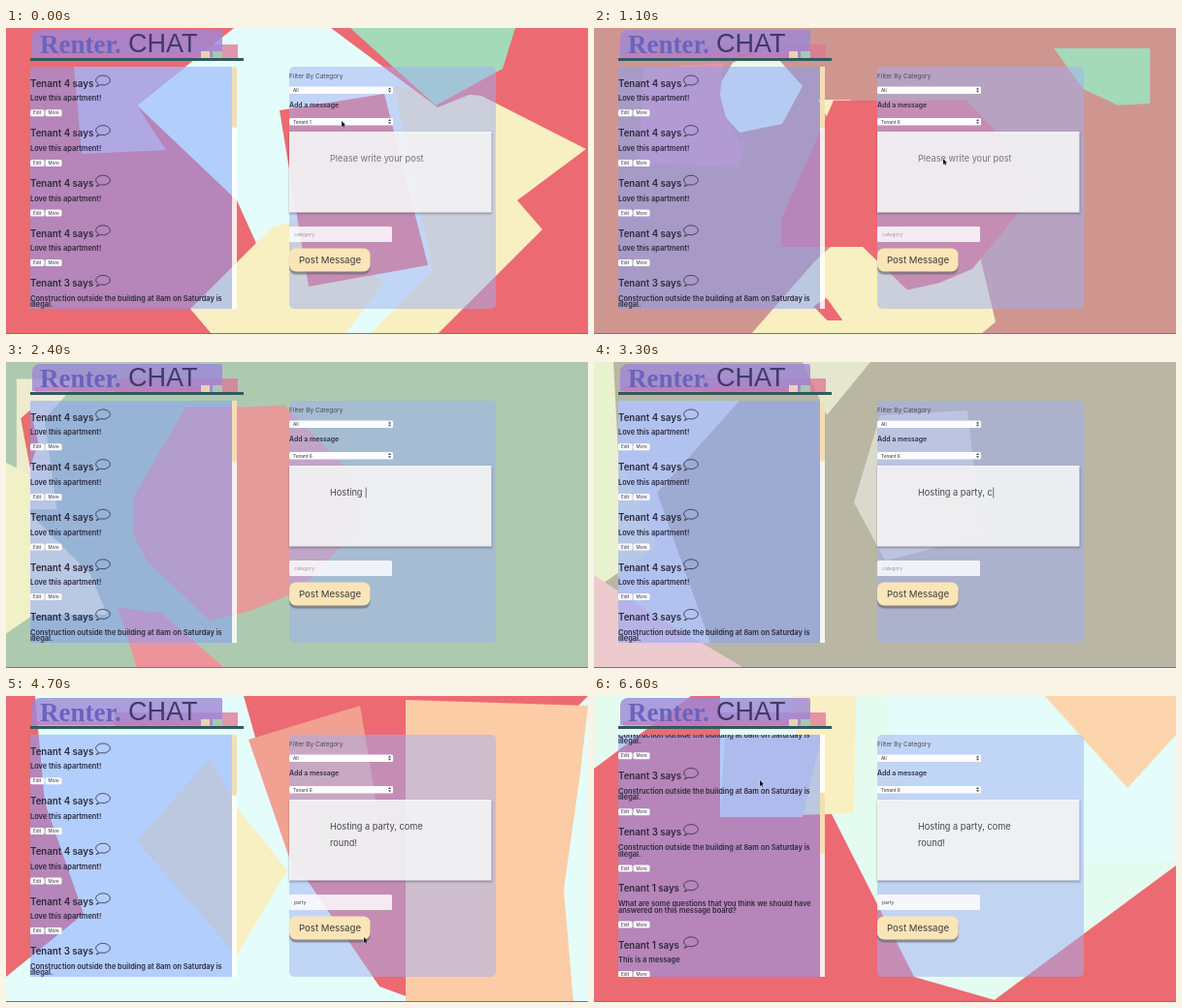
Animation, 600 px wide and 316 px high, one loop 6.7 s. Source, as an HTML page with a canvas:

```html
<!DOCTYPE html>
<html lang="en">
<head>
<meta charset="utf-8">
<title>Message board</title>
<style>
  html, body { margin: 0; width: 100%; height: 100%; overflow: hidden; }
  canvas { display: block; width: 600px; height: 316px; }
</style>
</head>
<body>
<canvas id="stage"></canvas>
<script>
const LOOP = 6700, STEP = 100;
const SANS = 'Inter, "Liberation Sans", sans-serif';
const canvas = document.getElementById('stage');
const ratio = window.devicePixelRatio || 1;
canvas.width = 600 * ratio;
canvas.height = 316 * ratio;
const ctx = canvas.getContext('2d');
ctx.scale(ratio, ratio);

// Background: coloured polygons that morph from scene to scene.
const RED = [236, 106, 114], SUN = [248, 240, 194], PALE = [228, 253, 250];
const GREEN = [164, 217, 186], PEACH = [251, 204, 166];
const LAYERS = ['pale', 'sun', 'sun2', 'red', 'red2', 'tint', 'top'];
const scenes = [];
const scene = (time, base, shapes) => scenes.push({ time, base, shapes });
const poly = (color, ...pts) => ({ color, pts });

scene(0, RED, {
  pale: poly(PALE, 135, 80, 235, 0, 340, 0, 480, 90, 480, 250, 380, 316, 300, 316, 238, 178),
  sun: poly(SUN, 400, 60, 490, 70, 598, 125, 527, 178, 553, 208, 445, 316, 375, 316, 440, 250),
  sun2: poly(SUN, 275, 205, 300, 200, 390, 262, 350, 316, 212, 316, 190, 290),
  red: poly(RED, 282, 85, 390, 68, 435, 245, 312, 267),
  red2: poly(RED, 335, 0, 600, 0, 600, 20, 445, 82),
  tint: poly([222, 178, 200], 70, 40, 185, 40, 135, 80, 165, 126, 78, 130),
  top: poly(GREEN, 355, 0, 525, 0, 512, 42, 443, 80)
});
scene(700, RED, {
  pale: poly(PALE, 238, 60, 300, 35, 345, 100, 310, 165, 250, 150, 200, 95),
  sun: poly(SUN, 385, 0, 440, 0, 545, 105, 600, 60, 600, 295, 575, 316, 270, 316, 380, 190, 480, 100),
  red: poly(RED, 345, 98, 500, 98, 550, 155, 500, 228, 445, 240, 305, 240),
  tint: poly([222, 178, 200], 80, 40, 205, 40, 200, 95, 232, 150, 60, 142),
  top: poly(GREEN, 435, 0, 600, 0, 600, 95, 545, 98, 485, 70)
});
scene(1700, GREEN, {
  pale: poly(SUN, 0, 0, 20, 0, 0, 45),
  sun: poly(SUN, 0, 185, 25, 205, 135, 316, 0, 316),
  sun2: poly(SUN, 172, 285, 225, 270, 255, 316, 175, 316),
  red: poly(RED, 100, 40, 210, 40, 335, 165, 225, 280, 140, 316, 25, 205, 25, 135),
  red2: poly(RED, 205, 280, 238, 258, 280, 316, 240, 316),
  tint: poly(RED, 8, 45, 25, 30, 40, 90, 25, 135)
});
scene(3300, [185, 182, 163], {
  pale: poly([225, 229, 224], 25, 40, 150, 40, 65, 135, 120, 290, 25, 290),
  sun: poly([233, 242, 207], 0, 0, 20, 0, 25, 95, 65, 190, 0, 235),
  sun2: poly([228, 231, 205], 215, 0, 285, 0, 240, 55),
  red: poly([217, 217, 205], 295, 55, 385, 50, 400, 180, 300, 205, 268, 145),
  red2: poly([236, 202, 206], 0, 220, 60, 260, 155, 316, 0, 316)
});
scene(4700, PALE, {
  pale: poly(PALE, 25, 40, 235, 40, 240, 290, 25, 290),
  sun: poly(SUN, 135, 150, 210, 65, 238, 115, 290, 180, 238, 268),
  red: poly(RED, 245, 0, 600, 0, 590, 10, 412, 30, 412, 310, 385, 300, 290, 160),
  red2: poly(RED, 0, 0, 30, 0, 40, 110, 80, 225, 0, 290),
  tint: poly([242, 160, 146], 250, 45, 365, 10, 385, 130, 300, 190),
  top: poly(PEACH, 412, 4, 600, 10, 592, 80, 575, 200, 585, 316, 412, 316)
});
scene(5800, [232, 253, 230], {
  pale: poly(PALE, 520, 0, 600, 0, 600, 105, 545, 145),
  sun: poly([250, 233, 187], 540, 140, 570, 95, 578, 135),
  red: poly(RED, 0, 80, 35, 30, 215, 30, 245, 120, 340, 290, 355, 316, 0, 316),
  red2: poly([239, 145, 145], 540, 235, 600, 160, 600, 270, 575, 316, 495, 316),
  tint: poly([249, 202, 168], 205, 0, 325, 0, 330, 120, 205, 120),
  top: poly(PEACH, 435, 0, 525, 0, 535, 70, 480, 60)
});
scene(6600, [228, 252, 240], {
  pale: poly(PALE, 300, 0, 460, 0, 550, 95, 600, 45, 600, 170, 330, 180),
  sun: poly(SUN, 205, 0, 270, 0, 268, 120, 215, 125),
  red: poly(RED, 0, 75, 100, 0, 130, 0, 130, 125, 245, 122, 330, 290, 420, 316, 0, 316),
  red2: poly(RED, 410, 316, 600, 175, 600, 316),
  tint: poly([222, 215, 220], 135, 40, 235, 40, 215, 125, 130, 125),
  top: poly([252, 213, 174], 465, 0, 600, 0, 600, 40, 550, 95)
});

const mix = (a, b, p) => a + (b - a) * p;
const mixAll = (a, b, p) => a.map((v, i) => mix(v, b[i], p));
const rgb = c => `rgb(${c.map(Math.round).join()})`;

function spread(pts) {
  const n = pts.length / 2, out = [];
  for (let i = 0; i < 12; i++) {
    const k = Math.floor(i * n / 12) * 2;
    out.push(pts[k], pts[k + 1]);
  }
  return out;
}

function shrink({ color, pts }) {
  const mean = k => pts.filter((_, i) => i % 2 === k).reduce((a, b) => a + b) * 2 / pts.length;
  return { color, pts: [mean(0), mean(1)] };
}

// Value from rows of [time, ...values], linear between rows.
function track(rows, t) {
  let i = 0;
  while (i < rows.length - 2 && t >= rows[i + 1][0]) i++;
  const [a, b] = [rows[i], rows[i + 1]];
  const p = Math.min(1, Math.max(0, (t - a[0]) / (b[0] - a[0])));
  return mixAll(a.slice(1), b.slice(1), p);
}

function box(x, y, w, h, fill, r = 0) {
  ctx.fillStyle = fill;
  ctx.beginPath();
  ctx.roundRect(x, y, w, h, r);
  ctx.fill();
}

function raised(drop, blur, color, draw) {
  ctx.save();
  ctx.shadowColor = color;
  ctx.shadowOffsetY = drop * ratio;
  ctx.shadowBlur = blur * ratio;
  draw();
  ctx.restore();
}

function text(str, x, cy, size, color = '#34323f', weight = 400, family = SANS) {
  ctx.font = `${weight} ${size}px ${family}`;
  ctx.fillStyle = color;
  ctx.fillText(str, x, cy + size * 0.36);
}

function drawBackground(t) {
  let i = 0;
  while (i < scenes.length - 2 && t >= scenes[i + 1].time) i++;
  const [a, b] = [scenes[i], scenes[i + 1]];
  const p = (t - a.time) / (b.time - a.time);
  box(0, 0, 600, 316, rgb(mixAll(a.base, b.base, p)));
  for (const name of LAYERS) {
    let from = a.shapes[name], to = b.shapes[name];
    if (!from && !to) continue;
    from = from || shrink(to);
    to = to || shrink(from);
    const pts = mixAll(spread(from.pts), spread(to.pts), p);
    ctx.fillStyle = rgb(mixAll(from.color, to.color, p));
    ctx.beginPath();
    for (let k = 0; k < pts.length; k += 2) ctx.lineTo(pts[k], pts[k + 1]);
    ctx.fill();
  }
}

function drawHeader() {
  box(112, 17, 127, 14, 'rgba(222,118,148,.75)');
  box(27, 2, 196, 28, 'rgba(158,136,216,.8)', [8, 2, 0, 0]);
  box(30, 26, 180, 5, 'rgba(205,120,175,.6)');
  box(201, 24, 9, 7, '#e9d3b4');
  box(213, 24, 10, 7, '#a9c7b4');
  box(25, 31, 220, 3, '#2f5a60');
  text('Renter.', 35, 16, 27, '#6b63bd', 700, '"Liberation Serif", serif');
  text('CHAT', 126, 15.5, 27, '#413a68', 400, '"Liberation Sans", sans-serif');
}

const LOVE = ['Love this apartment!'];
const WORK = ['Construction outside the building at 8am on Saturday is', 'illegal.'];
const ASK = ['What are some questions that you think we should have', 'answered on this message board?'];
const posts = [
  ...Array(4).fill([4, LOVE]), ...Array(3).fill([3, WORK]),
  [1, ASK], [1, ['This is a message']]
];

function smallButton(label, x, cy, w) {
  box(x, cy - 3.5, w, 7, '#fbfaff', 1.5);
  text(label, x + 3, cy, 4.6, '#333');
}

function bubble(x, cy) {
  ctx.strokeStyle = '#302d48';
  ctx.lineWidth = 0.8;
  ctx.beginPath();
  ctx.ellipse(x, cy, 7.4, 5, 0, Math.PI * 0.72, Math.PI * 2.62);
  ctx.lineTo(x - 7, cy + 6.5);
  ctx.closePath();
  ctx.stroke();
}

function drawPosts(t) {
  const [scroll] = track([[5850, 0], [6500, 239]], t);
  box(25, 40, 208, 250, 'rgba(130,160,255,.5)');
  box(233, 40, 5, 250, 'rgba(255,255,255,.85)');
  box(233, 40 + scroll / 4, 5, 63, '#f6deb2', 2);
  ctx.save();
  ctx.beginPath();
  ctx.rect(25, 40, 208, 250);
  ctx.clip();
  let y = 57.3 - scroll;
  for (const [who, lines] of posts) {
    const extra = (lines.length - 1) * 6.5;
    text(`Tenant ${who} says`, 25, y, 9.7, '#2c2a3c', 600);
    bubble(100, y - 3.3);
    lines.forEach((line, i) => text(line, 25, y + 15.5 + i * 6.5, 7.4, '#2c2a3c', 600));
    smallButton('Edit', 25, y + 30.5 + extra, 14.5);
    smallButton('More', 40.5, y + 30.5 + extra, 17);
    y += 51.6 + extra;
  }
  ctx.restore();
}

function select(label, y) {
  box(292, y, 107, 7.5, '#fdfcff', 1.5);
  text(label, 296, y + 3.8, 4.8, '#333');
  ctx.fillStyle = '#444';
  for (const d of [-1, 1]) {
    ctx.beginPath();
    ctx.moveTo(394, y + 3.7 + d * 0.6);
    ctx.lineTo(397, y + 3.7 + d * 0.6);
    ctx.lineTo(395.5, y + 3.7 + d * 2.6);
    ctx.fill();
  }
}

const MESSAGE = 'Hosting a party, come round!';
const BREAK = 21;

function drawMessage(t) {
  if (t < 1200) return text('Please write your post', 334, 135, 9.2, '#77757a');
  const n = Math.floor(track([[1200, 0], [1700, 8], [2500, 8], [3300, 18], [3900, 28]], t)[0] + 0.001);
  const first = MESSAGE.slice(0, Math.min(n, BREAK));
  const second = MESSAGE.slice(BREAK + 1, n);
  text(first, 334, 135, 9.2, '#48464b');
  text(second, 334, 152, 9.2, '#48464b');
  if (t < 4000) {
    const x = 334 + ctx.measureText(n > BREAK ? second : first).width;
    box(x + 0.7, n > BREAK ? 146.5 : 129.5, 0.8, 11, '#555');
  }
}

function drawForm(t) {
  box(292, 40, 213, 250, 'rgba(160,175,245,.5)', 5);
  text('Filter By Category', 292, 50, 6.5, '#4b4a58');
  select('All', 60.5);
  text('Add a message', 292, 80, 6.9, '#333142', 600);
  select(t < 900 ? 'Tenant 1' : 'Tenant 6', 93);
  raised(1, 2, 'rgba(60,60,70,.5)', () => box(292, 107, 208.5, 83.5, 'rgba(255,255,255,.86)'));
  drawMessage(t);
  box(292, 205, 106, 16, 'rgba(255,255,255,.82)', 1.5);
  const typed = Math.floor(track([[3900, 0], [4300, 5]], t)[0]);
  text(typed ? 'party'.slice(0, typed) : 'category', 297, 213, 5, typed ? '#444' : '#99969c');
  raised(3, 1, 'rgba(110,105,110,.7)', () => box(292, 227.5, 83.5, 24, '#fae5b7', 7));
  text('Post Message', 302, 240, 9.6, '#3c3940');
}

function drawMenu(t) {
  if (t < 300 || t >= 900) return;
  const hover = t < 500 ? 0 : t < 600 ? 2 : t < 800 ? 3 : 5;
  raised(1.5, 4, 'rgba(40,40,50,.5)', () => box(288, 91.5, 106.5, 76.5, '#f7f4f3', 2));
  box(288, 93.2 + hover * 6.65, 106.5, 6.6, '#a09ea4');
  for (let i = 0; i < 11; i++) {
    text(`Tenant ${i + 1}`, 297, 96.5 + i * 6.65, 4.8, i === hover ? '#fff' : '#333');
  }
  ctx.strokeStyle = '#333';
  ctx.lineWidth = 0.8;
  ctx.beginPath();
  ctx.moveTo(290.5, 96.7);
  ctx.lineTo(291.6, 98);
  ctx.lineTo(293.5, 94.8);
  ctx.stroke();
}

const PATH = [
  [0, 346, 96], [300, 346, 97], [700, 358.5, 113], [900, 356, 129], [1200, 362, 138],
  [4300, 352, 215], [4700, 369, 249], [5000, 369, 249], [5600, 171, 87], [6700, 171, 87]
];

function drawPointer(t) {
  if (t >= 1200 && t < 4300) return;
  const [x, y] = track(PATH, t);
  ctx.save();
  ctx.translate(x, y);
  ctx.beginPath();
  for (const [px, py] of [[0, 0], [0, 6], [1.3, 4.9], [2.2, 6.8], [3.1, 6.4], [2.3, 4.5], [4.1, 4.3]]) ctx.lineTo(px, py);
  ctx.closePath();
  ctx.fillStyle = '#111';
  ctx.strokeStyle = '#fff';
  ctx.lineWidth = 0.7;
  ctx.stroke();
  ctx.fill();
  ctx.restore();
}

function render(t) {
  drawBackground(t);
  drawHeader();
  drawPosts(t);
  drawForm(t);
  drawMenu(t);
  drawPointer(t);
  box(0, 315, 600, 1, '#77757a');
}

const start = performance.now();
function tick() {
  const t = (performance.now() - start) % LOOP;
  render(Math.floor(t / STEP) * STEP);
  requestAnimationFrame(tick);
}
tick();
</script>
</body>
</html>
```
